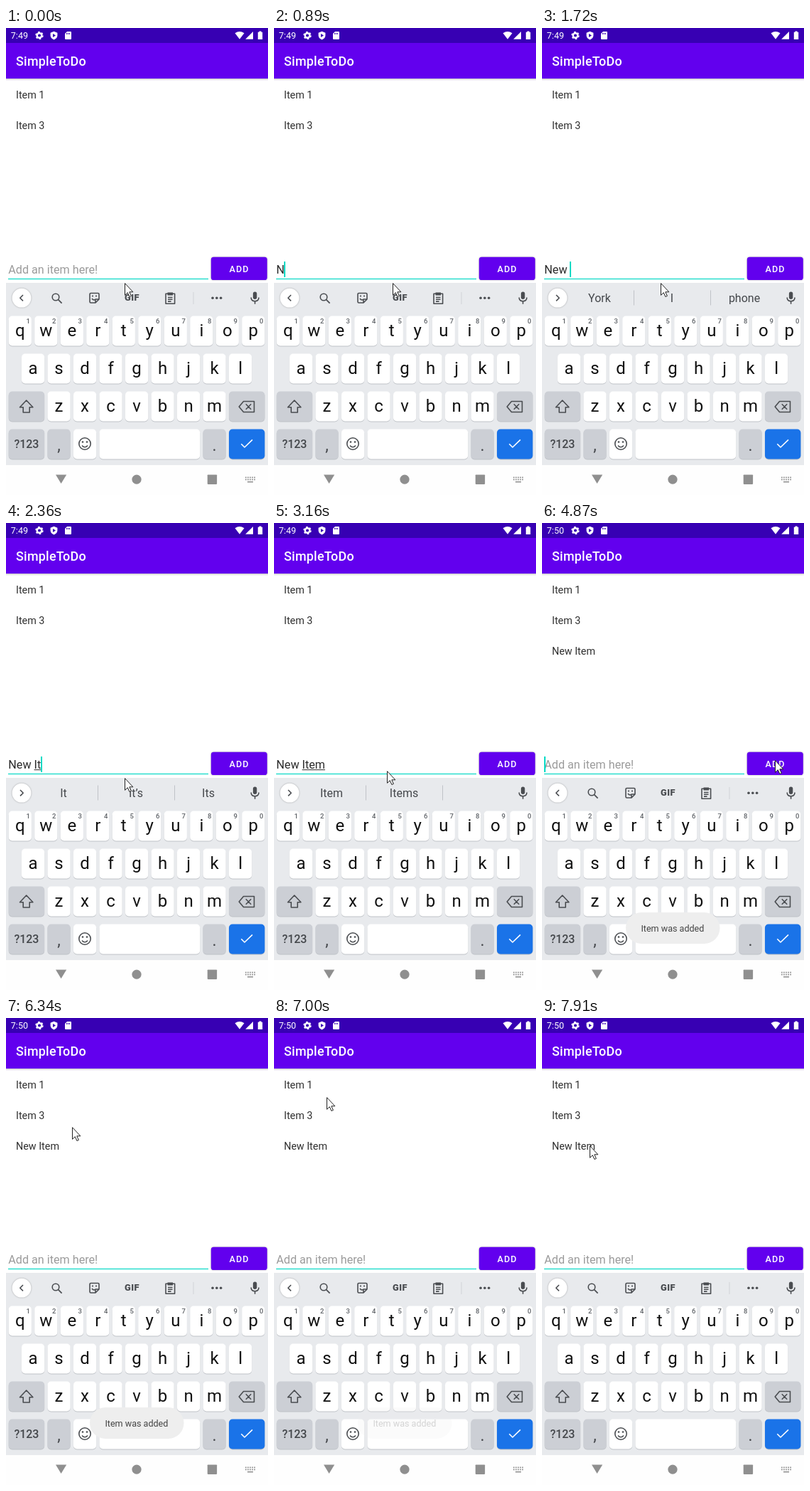
Write an HTML page that moves like this. It is 369x656 px and loops after 8 s.

```html
<!DOCTYPE html>
<html lang="en">
<head>
<meta charset="utf-8">
<title>To-do list</title>
<style>
  html, body { margin: 0; width: 100%; height: 100%; overflow: hidden; background: #fff; }
  svg { display: block; width: 100vw; height: 100vh; font-family: Roboto, sans-serif; }
  text { white-space: pre; }
  .mid { text-anchor: middle; }
  .line { fill: none; stroke: #4a4d51; stroke-width: 1.6; stroke-linejoin: round; }
  .raised { filter: drop-shadow(0 .8px .8px rgba(0, 0, 0, .3)); }
</style>
</head>
<body>
<svg viewBox="0 0 369 656">
  <defs>
    <linearGradient id="shade" x2="0" y2="1">
      <stop offset="0" stop-opacity=".2"/><stop offset="1" stop-opacity="0"/>
    </linearGradient>
    <clipPath id="buttonClip"><rect x="288.8" y="321.8" width="79" height="32.3" rx="3.6"/></clipPath>
  </defs>

  <rect width="369" height="656" fill="#fff"/>
  <rect y="71" width="369" height="3" fill="url(#shade)"/>
  <rect y="21" width="369" height="50" fill="#6200ee"/>
  <rect width="369" height="21" fill="#3700b3"/>

  <!-- status bar -->
  <g fill="#fff">
    <text id="clock" x="6.8" y="15.3" font-size="12.57"></text>
    <circle cx="47" cy="10.5" r="3.3" fill="none" stroke="#fff" stroke-width="2.5"/>
    <circle cx="47" cy="10.5" r="4.9" fill="none" stroke="#fff" stroke-width="1.6" stroke-dasharray="2.6 2.53"/>
    <path d="M67.5 4.7l4.9 2v3.6q0 4.2-4.9 6.2q-4.9-2-4.9-6.2v-3.6z"/>
    <path d="M66 8l4 2.5-4 2.5z" fill="#3700b3"/>
    <path d="M86 5h5q1 0 1 1v9q0 1-1 1h-7q-1 0-1-1V8z"/>
    <path d="M85.5 7v2m2-2v2m2-2v2" stroke="#3700b3"/>
    <path d="M322.5 7.3q6.5-4.8 13 0L329 15.8z"/>
    <path d="M348 5v10.8h-10.8z"/>
    <path d="M356.5 4.5h3v1.2h1.7v10.3h-6.4V5.7h1.7z"/>
    <text x="14" y="53.2" font-size="17.97" font-weight="500" letter-spacing=".23">SimpleToDo</text>
  </g>

  <!-- list and entry field -->
  <g font-size="14.37" fill="#303030">
    <text x="14" y="98.6">Item 1</text>
    <text x="14" y="141.7">Item 3</text>
    <text id="newItem" x="14" y="184.8">New Item</text>
  </g>
  <text id="entry" x="3.3" y="345.2" font-size="16.16"></text>
  <rect id="underline" y="346.2" height="1"/>
  <rect x="3" y="351.8" width="282" height="1.4" fill="#1fdccb"/>
  <rect id="caret" y="328" width="2" height="22" fill="#03dac5"/>
  <rect class="raised" x="288.8" y="321.8" width="79" height="32.3" rx="3.6" fill="#6200ee"/>
  <g clip-path="url(#buttonClip)"><circle id="ripple" cx="328" cy="335" fill="#fff"/></g>
  <text x="328.6" y="342.8" class="mid" font-size="12.57" font-weight="500" letter-spacing="1.12" fill="#fff">ADD</text>

  <!-- keyboard -->
  <rect y="358" width="369" height="256" fill="#e8eaed"/>
  <circle class="raised" cx="22" cy="379.2" r="13.4" fill="#fff"/>
  <path id="chevron" class="line"/>
  <g id="tools">
    <circle class="line" cx="70" cy="378" r="4.8"/>
    <path class="line" d="M73.6 381.6l5 5"/>
    <path class="line" d="M119.5 372.5h10q1.5 0 1.5 1.5v7l-5 5h-6.5q-1.5 0-1.5-1.5V374q0-1.5 1.5-1.5zM126 386v-5h5"/>
    <path class="line" d="M121 380q2 3 4.5 1.5"/>
    <g fill="#4a4d51">
      <circle cx="122" cy="376.5" r="1.1"/><circle cx="127" cy="376.5" r="1.1"/>
      <text x="177.5" y="383.4" class="mid" font-size="12.8" font-weight="900" letter-spacing=".5">GIF</text>
      <path d="M227.5 371.5h7.5v4h-7.5z"/>
      <circle cx="291" cy="379.3" r="1.8"/><circle cx="296.8" cy="379.3" r="1.8"/><circle cx="302.6" cy="379.3" r="1.8"/>
    </g>
    <path class="line" d="M225 373.3h12.6v14H225zM228 378.5h6.5m-6.5 2.8h6.5m-6.5 2.8h4.5"/>
    <path d="M264 371v17" stroke="#d0d3d7"/>
  </g>
  <g id="words" font-size="16" fill="#44474b" class="mid">
    <text x="81" y="385.4"></text><text x="183" y="385.4"></text><text x="285" y="385.4"></text>
    <path d="M129.5 368.5v21m108-21v21" stroke="#c0c3c8"/>
  </g>
  <rect x="347.9" y="370.5" width="5.4" height="10.5" rx="2.7" fill="#4a4d51"/>
  <path class="line" d="M345.2 378.5q0 5.2 5.4 5.2t5.4-5.2m-5.4 5.2v4"/>

  <g id="keys"></g>
  <path id="shift" class="line" d="M28.7 523l-9.2 9.8h4.7v7.2h9v-7.2h4.7z"/>
  <path class="line" d="M334.5 524.5h15v15h-15l-6.3-7.5zM337.8 528.3l7.4 7.4m0-7.4l-7.4 7.4"/>
  <circle class="line" cx="111" cy="584" r="8.2"/>
  <path class="line" d="M107 586.5q4 4.5 8 0"/>
  <circle cx="108" cy="581.5" r="1.3" fill="#4a4d51"/><circle cx="114" cy="581.5" r="1.3" fill="#4a4d51"/>
  <path d="M331.3 584.3l4.7 4.7 11-10.6" fill="none" stroke="#fff" stroke-width="1.6"/>

  <!-- navigation bar -->
  <rect y="614" width="369" height="42" fill="#fefefe"/>
  <g fill="#8f8f8f">
    <path d="M70 627.5h15.2l-7.6 12.6z"/>
    <circle cx="184" cy="634.2" r="6.6"/>
    <rect x="283.7" y="627.5" width="13.4" height="13.4" rx=".8"/>
    <path d="M337 631.3h14m-14 3h14" fill="none" stroke="#8f8f8f" stroke-width="1.7" stroke-dasharray="1.7 1.37"/>
    <rect x="340" y="636.8" width="8" height="1.6"/>
  </g>

  <g id="toast">
    <rect x="118" y="547" width="132.5" height="44" rx="22" fill="#eee"/>
    <text x="139.4" y="574" font-size="12.57" fill="#444">Item was added</text>
  </g>
  <path id="mouse" d="M.5 .7v16.6l3.8-3.6 2.6 5.8 2.5-1.1-2.6-5.6h5.1z" fill="#fff" stroke="#222"/>
</svg>

<script>
const LOOP = 8000, BLINK = 477, POINTER_STEP = 131.5;
const PRESS = 4450, ADDED = 4570;
const $ = id => document.getElementById(id);

// Keyboard: columns and rows are counted in key units
const PITCH = 36.5, GAP = 4.3, GREY = '#cccfd5', INK = '#44474b';
const left = col => 3.7 + col * PITCH;
const top_ = row => 404.5 + row * 53;
const letters = [];

function add(tag, attrs, content = '') {
  const el = document.createElementNS('http://www.w3.org/2000/svg', tag);
  for (const name in attrs) el.setAttribute(name, attrs[name]);
  el.textContent = content;
  return $('keys').appendChild(el);
}
function addKey(col, row, span = 1, fill = '#fff') {
  const box = { x: left(col), width: span * PITCH - GAP, height: 42, rx: 5 };
  add('rect', { ...box, y: top_(row) + 1, fill: '#c0c3c8' });
  add('rect', { ...box, y: top_(row), fill });
}
function addLabel(content, col, row, span, size, dx, dy, fill = '#111', weight = 400) {
  const x = left(col) + (span * PITCH - GAP) / 2 + dx, y = top_(row) + dy;
  return add('text', { x, y, class: 'mid', 'font-size': size, fill, 'font-weight': weight }, content);
}

['qwertyuiop', 'asdfghjkl', 'zxcvbnm'].forEach((line, row) => {
  const indent = row * (row + 1) / 4;
  [...line].forEach((letter, i) => {
    addKey(indent + i, row);
    letters.push(addLabel(letter, indent + i, row, 1, 24, 0, 28.5));
    if (row === 0) addLabel((i + 1) % 10, i, row, 1, 9.5, 11.3, 10.5, '#5f6368', 500);
  });
});
addKey(0, 2, 1.5, GREY);
addKey(8.5, 2, 1.5, GREY);
addKey(0, 3, 1.5, GREY);
addKey(1.5, 3, 1, GREY);
addKey(2.5, 3);
addKey(3.5, 3, 4);
addKey(7.5, 3, 1, GREY);
addKey(8.5, 3, 1.5, '#1a73e8');
addLabel('?123', 0, 3, 1.5, 16, 0, 26.5, INK, 500);
addLabel(',', 1.5, 3, 1, 23, 0, 30.5, INK);
addLabel('.', 7.5, 3, 1, 23, 0, 30.5, INK);

// Motion
const bursts = [
  { text: 'New ', start: 740, pace: 325 },
  { text: 'Item', start: 2110, pace: 163 }
];
const suggestions = {
  'N': ['N', 'Not', 'No'], 'Ne': ['Ne', 'New', 'No'], 'New': ['New', 'News', 'Newer'],
  'New ': ['York', 'I', 'phone'], 'New I': ['I', 'I’m', 'Information'], 'New It': ['It', 'It’s', 'Its'],
  'New Ite': ['Ite', 'Item', 'Items'], 'New Item': ['Item', 'Items', '']
};
const stops = [
  { t: 3000, x: 167, y: 358 }, { t: 3160, x: 159, y: 348 }, { t: 3410, x: 286, y: 331 },
  { t: 3670, x: 328, y: 333 }, { t: 4870, x: 328, y: 333 }, { t: 5500, x: 44, y: 49 },
  { t: 6200, x: 94, y: 157 }, { t: 6850, x: 75, y: 104 }, { t: 7500, x: 67, y: 179 }
];

const ramp = (t, from, to) => Math.min(1, Math.max(0, (t - from) / (to - from)));
const ease = u => u * u * (3 - 2 * u);

// Text in the field and the time of the last edit
function typing(t) {
  if (t >= ADDED) return { text: '', edited: ADDED };
  let text = '', edited = 590 - BLINK;
  for (const { text: part, start, pace } of bursts) {
    if (t < start) break;
    const count = Math.min(part.length, 1 + Math.floor((t - start) / pace));
    text += part.slice(0, count);
    edited = start + (count - 1) * pace;
  }
  return { text, edited };
}

// The pointer is seen only at regular steps
function pointer(t) {
  const seen = Math.floor((t + 40) / POINTER_STEP) * POINTER_STEP;
  const next = stops.findIndex(stop => stop.t > seen);
  if (next < 0) return stops.at(-1);
  const b = stops[next], a = stops[next - 1] || b;
  const u = ease(ramp(seen, a.t, b.t) || 0);
  return { x: a.x + (b.x - a.x) * u, y: a.y + (b.y - a.y) * u };
}

const pen = document.createElement('canvas').getContext('2d');
pen.font = '16.16px Roboto, sans-serif';
const widthOf = s => pen.measureText(s).width;

function set(id, attrs) {
  for (const name in attrs) $(id).setAttribute(name, attrs[name]);
}
function setText(el, value) {
  if (el.textContent !== value) el.textContent = value;
}

function render(t) {
  const { text, edited } = typing(t);
  setText($('clock'), t < 3280 ? '7:49' : '7:50');
  set('newItem', { opacity: t < ADDED ? 0 : 1 });
  setText($('entry'), text || 'Add an item here!');
  set('entry', { fill: text ? '#2a2a2a' : '#9b9b9b' });
  set('caret', {
    x: Math.round(2.7 + widthOf(text)),
    opacity: Math.floor((t - edited) / BLINK) % 2 ? 0 : 1
  });

  const before = widthOf(bursts[0].text);
  set('underline', { x: 3.3 + before, width: Math.max(0, widthOf(text) - before), fill: '#2a2a2a' });

  const open = t >= 1040 && text !== '';
  const words = open ? suggestions[text] : [];
  set('tools', { opacity: open ? 0 : 1 });
  set('words', { opacity: open ? 1 : 0 });
  set('chevron', { d: open ? 'M20 375l4.2 4.2-4.2 4.2' : 'M24 375l-4.2 4.2 4.2 4.2' });
  document.querySelectorAll('#words text').forEach((el, i) => setText(el, words[i] || ''));

  const shifted = t >= 740 && t < 890;
  for (const el of letters) {
    const letter = el.textContent;
    setText(el, shifted ? letter.toUpperCase() : letter.toLowerCase());
  }
  $('shift').style.fill = shifted ? '#4a4d51' : 'none';

  const spread = ramp(t, PRESS, PRESS + 400);
  set('ripple', { r: 28 + 32 * spread, opacity: t < PRESS ? 0 : 0.19 * (1 - spread) });
  set('toast', { opacity: ramp(t, 4530, 4700) * (1 - ramp(t, 6730, 7080)) });

  const { x, y } = pointer(t);
  set('mouse', { transform: `translate(${Math.round(x)} ${Math.round(y)})` });
}

const began = performance.now();
function tick() {
  render((performance.now() - began) % LOOP);
  requestAnimationFrame(tick);
}
tick();
</script>
</body>
</html>
```
